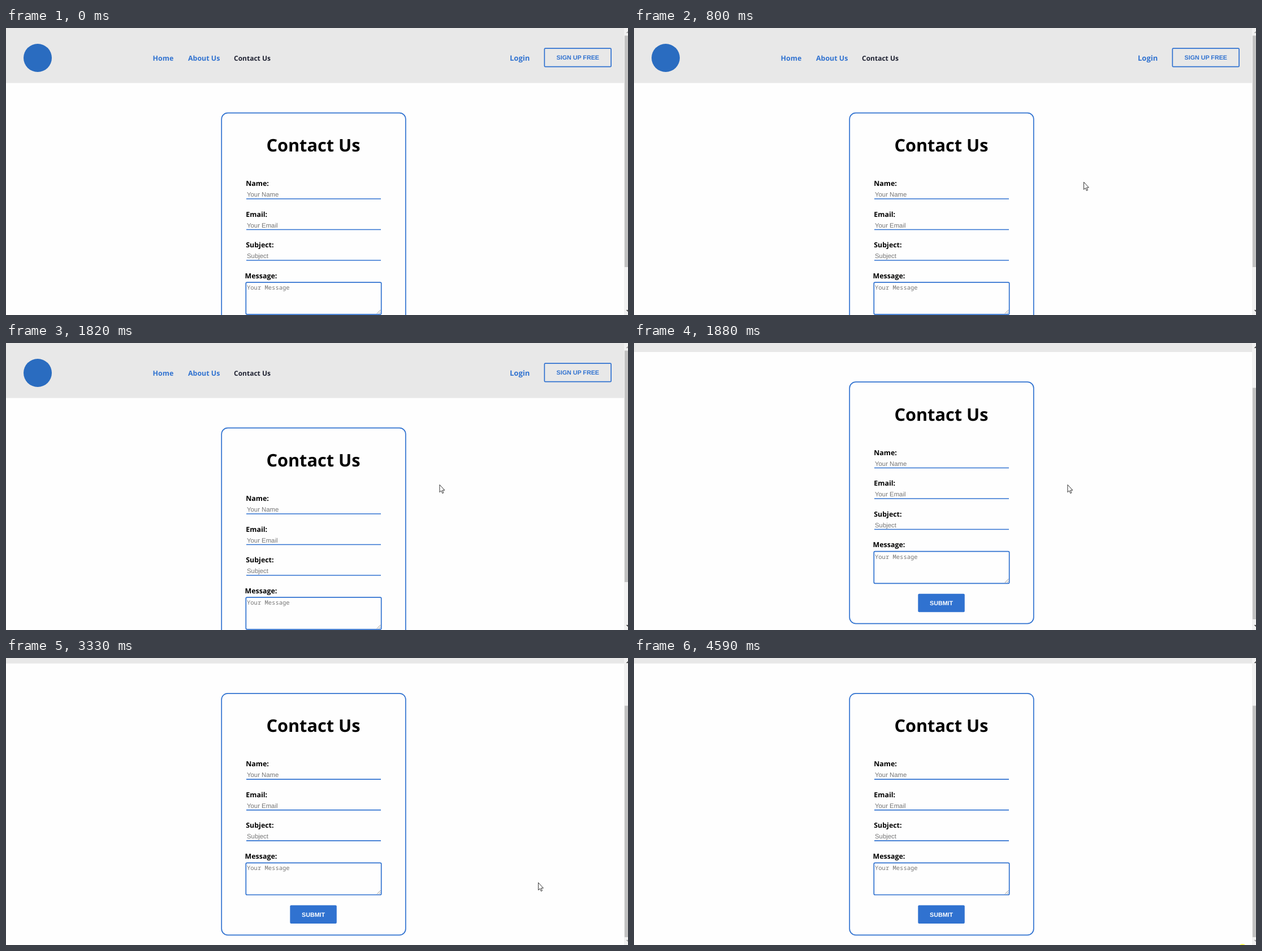
Write an HTML page that moves like this. It is 1100 px wide and 509 px high and loops after 4.66 s.

```html
<!DOCTYPE html>
<html lang="en">
<head>
<meta charset="utf-8">
<title>Contact form</title>
<style>
  html, body { margin: 0; width: 100%; height: 100%; overflow: hidden; background: #fefefe; }
  svg { display: block; width: 1100px; height: 509px; }
  text { text-rendering: geometricPrecision; white-space: pre; }
  .bold { font: 700 12.4px "Open Sans", "Noto Sans", sans-serif; }
  .title { font-size: 30.7px; }
  .hint { font: 11.35px "Liberation Sans", Arial, sans-serif; fill: #757575; }
  .mono { font: 10.5px "Noto Sans Mono", "DejaVu Sans Mono", monospace; fill: #757575; }
  .caps { font: 700 10.73px "Liberation Sans", Arial, sans-serif; }
  .blue { fill: #3072d0; }
  .line { fill: none; stroke: #3072d0; stroke-width: 1.7; }
</style>
</head>
<body>
<svg viewBox="0 0 1100 509">
  <g id="page">
    <rect width="1093" height="97.5" fill="#e8e8e8"/>
    <circle cx="56" cy="53" r="25" fill="#2a6cc0"/>
    <g class="bold">
      <text class="blue" x="259.6" y="58">Home</text>
      <text class="blue" x="322" y="58">About Us</text>
      <text x="403" y="58" style="font-size:12px" fill="#1d2030">Contact Us</text>
      <text class="blue" x="891" y="58" style="font-size:13px">Login</text>
      <text class="title" x="460.4" y="219">Contact Us</text>
    </g>
    <rect class="line" x="952.3" y="36.2" width="117.8" height="32.5" rx="1.5"/>
    <text class="caps blue" x="973.5" y="56">SIGN UP FREE</text>

    <rect class="line" x="381.2" y="150.6" width="325.6" height="428.5" rx="11"/>
    <g id="fields"></g>
    <text class="bold" x="422.6" y="443.7">Message:</text>
    <rect class="line" x="424.3" y="451.2" width="239.4" height="56.6" rx="2"/>
    <text class="mono" x="426" y="464.2">Your Message</text>
    <path d="M656 506.5l6.5-6.5M659.5 506.5l3-3" stroke="#777" stroke-width=".8"/>
    <rect class="blue" x="502.3" y="526.3" width="82.5" height="32.5" rx="2"/>
    <text class="caps" x="523" y="546.5" fill="#fff">SUBMIT</text>
  </g>

  <rect x="1093" width="7" height="509" fill="#f1f1f1"/>
  <rect id="thumb" x="1094" y="13.5" width="6" height="410.5" fill="#c1c1c1"/>
  <path id="up" d="M1096.5 9l3.5-3.5 3.5 3.5z"/>
  <path id="down" d="M1096.5 500l3.5 3.5 3.5-3.5z"/>

  <circle id="glow" cx="1076" cy="514.3" r="7.3" fill="#ffff50"/>
  <path id="cursor" d="M.4.4V13.6L3.3 10.9 5.3 15.6 7.3 14.7 5.4 10.1H9.3Z"
        fill="#fff" stroke="#111" stroke-width=".85"/>
</svg>
<script>
const $ = id => document.getElementById(id);
const LOOP = 4660, STEP = 70;

$('fields').innerHTML = [['Name:', 'Your Name'], ['Email:', 'Your Email'], ['Subject:', 'Subject']]
  .map(([label, hint], i) => `<g transform="translate(0 ${i * 54.5})">
    <text class="bold" x="424.3" y="280">${label}</text>
    <text class="hint" x="426" y="299">${hint}</text>
    <path class="line" d="M425 303H663"/></g>`).join('');

// Each stroke continues from the last point along a curve bent towards `via`.
const entry = [1037, 499];
const strokes = [
  { start: 460, steps: 7, via: [763, 260], to: [782, 247] },
  { start: 950, steps: 1, via: [782, 244], to: [781, 241] },
  { start: 1280, steps: 7, via: [774, 243], to: [766.5, 251] },
  { start: 3050, steps: 4, via: [870, 345], to: [941, 398] },
  { start: 3960, steps: 5, via: [1005, 438], to: [1088, 499] }
];

// The pointer is sampled every STEP ms, with a little slack for uneven timing.
function pointer(t) {
  let pos = entry;
  for (const { start, steps, via, to } of strokes) {
    if (t < start) break;
    const u = Math.min(1, Math.floor((t - start + 10) / STEP) / steps), v = 1 - u;
    pos = pos.map((p, i) => v * v * p + 2 * u * v * via[i] + u * u * to[i]);
  }
  return pos;
}

function show(id, on) {
  $(id).style.display = on ? '' : 'none';
}

function draw(now) {
  const t = now % LOOP;
  const scroll = t < 1880 ? 0 : t < 2740 ? 81.5 : 87.8;
  $('page').setAttribute('transform', `translate(0 ${-scroll})`);
  $('thumb').setAttribute('y', 13.5 + scroll * .81);
  $('up').setAttribute('fill', scroll ? '#505050' : '#a3a3a3');
  $('down').setAttribute('fill', scroll > 85 ? '#a3a3a3' : '#505050');
  $('cursor').setAttribute('transform', `translate(${pointer(t)})`);
  show('cursor', t >= 460 && t < 4370);
  show('glow', t >= 4590);
  requestAnimationFrame(draw);
}
draw(performance.now());
</script>
</body>
</html>
```
